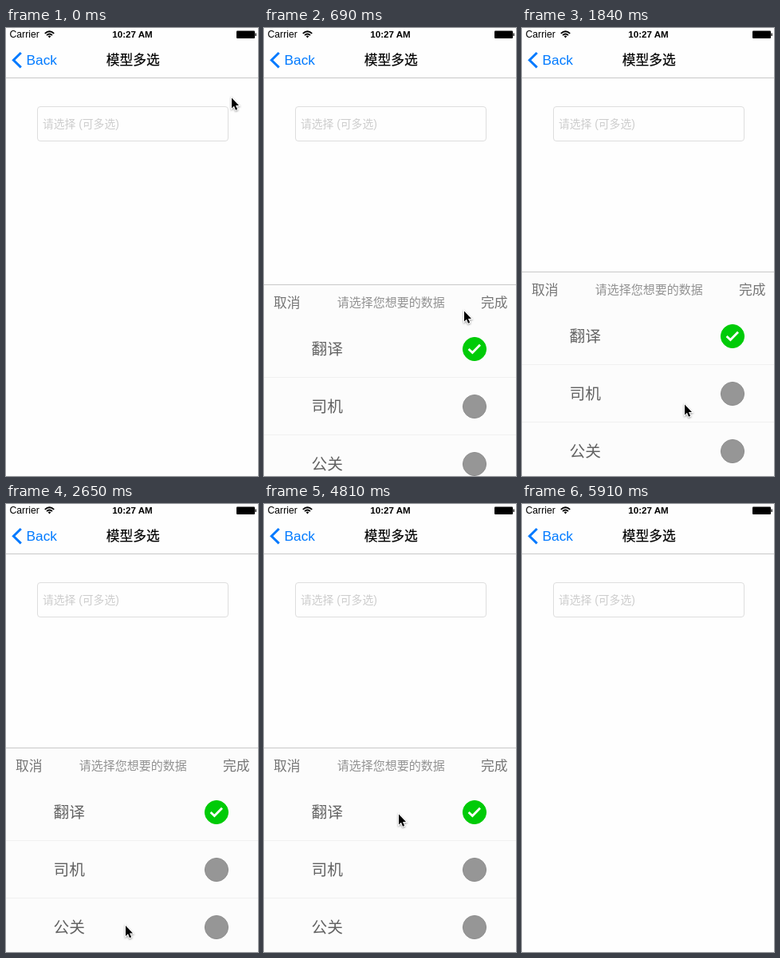
These frames come from a looping animation (316 px wide and 561 px high, 6020 ms). An HTML page:

```html
<!DOCTYPE html>
<html lang="zh-CN">
<head>
<meta charset="utf-8">
<style>
html, body { margin: 0; width: 100%; height: 100%; overflow: hidden; background: #fefefe; }
svg { display: block; width: 316px; height: 561px; }
text { font-family: "Liberation Sans", "Noto Sans CJK SC", "Noto Sans CJK", sans-serif; }
.line { fill: none; stroke: #c9c9c9; }
.button { font-size: 16.8px; fill: #757575; }
.row text { font-size: 19.7px; fill: #626262; }
.row circle { fill: #969696; stroke: #8e8e8e; }
.row polyline { fill: none; stroke: #fff; stroke-width: 2.8; visibility: hidden; }
.row.on circle { fill: #00cb08; stroke: #00cb08; }
.row.on polyline { visibility: visible; }
#cursor { stroke: #fff; stroke-width: 2; paint-order: stroke; filter: drop-shadow(0 1px 1px #0006); }
</style>
</head>
<body>
<svg viewBox="0 0 316 561">
  <rect width="316" height="561" fill="#fefefe"/>

  <text x="4.5" y="12.3" font-size="12.2">Carrier</text>
  <g fill="none" stroke="#000" stroke-width="1.9">
    <path d="M48.8 6.9Q54.5 1.7 60.2 6.9M51 9.1Q54.5 6 58 9.1"/>
    <path d="M52.6 10.3Q54.5 8.9 56.4 10.3L54.5 12.4z" fill="#000" stroke="none"/>
  </g>
  <text x="158.5" y="12.1" font-size="11.6" font-weight="bold" text-anchor="middle">10:27 AM</text>
  <rect x="289" y="3.5" width="23" height="9.5" rx="1"/>
  <rect x="312.5" y="6.5" width="1.3" height="3.5"/>

  <path d="M18.8 31L9.4 40.2 18.8 49.4" fill="none" stroke="#007aff" stroke-width="3"/>
  <text x="25.5" y="46" font-size="17.3" fill="#007aff">Back</text>
  <text x="159.2" y="46.3" font-size="16.8" font-weight="500" text-anchor="middle" stroke="#000" stroke-width=".2">模型多选</text>
  <path class="line" d="M0 62.5H316"/>

  <rect x="39.5" y="98.5" width="239" height="43" rx="3.5" fill="#fefefe" stroke="#dedede"/>
  <text x="46" y="124.7" font-size="13.8" fill="#cdcdcd">请选择 (可多选)</text>

  <g id="sheet">
    <rect width="316" height="256" fill="#fcfcfc"/>
    <path class="line" d="M0 .5H316"/>
    <text class="button" x="12" y="28.8">取消</text>
    <text x="159.3" y="28.3" font-size="15" fill="#929292" text-anchor="middle">请选择您想要的数据</text>
    <text class="button" id="done" x="272" y="28.8">完成</text>
    <g id="rows"></g>
  </g>

  <path id="cursor" d="M0 0V13L3 10.2 5 15.2 7.2 14.2 5 9.4H9z"/>
</svg>
<script>
const LOOP = 6020, TOP = 305, HEIGHT = 256, SLIDE = 300, MOVE = 300;
const $ = id => document.getElementById(id);

$("rows").innerHTML = ["翻译", "司机", "公关"].map((name, i) => `
  <g class="row" transform="translate(0 ${45 + 72 * i})">
    <path d="M0 71.5H316" stroke="#f0f0f0"/>
    <text x="59.5" y="43.3">${name}</text>
    <circle cx="264" cy="36" r="14.6"/>
    <polyline points="256.6,36 261.4,40.6 271,30.8"/>
  </g>`).join("");
const rows = document.querySelectorAll(".row");

// Each tap toggles its row; the first row starts ticked
const taps = [[0], [1390, 1720, 3800, 4100], [2350, 2590]];

// Pointer stops: arrival time, x, y
const stops = [
  [0, 283, 87.5], [320, 250, 114], [690, 251, 354.5], [1090, 214, 458],
  [1550, 202, 484], [1840, 204, 471.5], [2350, 150, 528], [2990, 196, 388],
  [3520, 182, 463.5], [3800, 146, 474], [4390, 174, 392], [4810, 169, 388.5],
  [5230, 287, 325], [5500, 284, 431], [5720, 282, 580]
];

const ramp = (t, start, length) => Math.min(1, Math.max(0, (t - start) / length));
const ease = p => p * p * (3 - 2 * p);

// Rest at a stop, then glide so as to arrive at the next one on time
function pointer(t) {
  let [last, x, y] = stops[0];
  for (const [time, nextX, nextY] of stops.slice(1)) {
    const length = Math.min(MOVE, time - last);
    const p = ease(ramp(t, time - length, length));
    x += (nextX - x) * p;
    y += (nextY - y) * p;
    last = time;
  }
  return [x, y];
}

function draw(now) {
  const t = now % LOOP;
  const open = ease(ramp(t, 437, SLIDE)) - ease(ramp(t, 5383, SLIDE));
  $("sheet").setAttribute("transform", `translate(0 ${Math.round(TOP + HEIGHT * (1 - open))})`);
  rows.forEach((row, i) =>
    row.classList.toggle("on", taps[i].filter(time => time <= t).length % 2 === 1));
  $("done").setAttribute("opacity", t < 5270 ? 1 : 0.2 + 0.8 * ramp(t, 5460, 240));
  $("cursor").setAttribute("transform", `translate(${pointer(t)})`);
}

const start = performance.now();
function tick() {
  draw(Math.max(0, performance.now() - start));
  requestAnimationFrame(tick);
}
tick();
</script>
</body>
</html>
```
